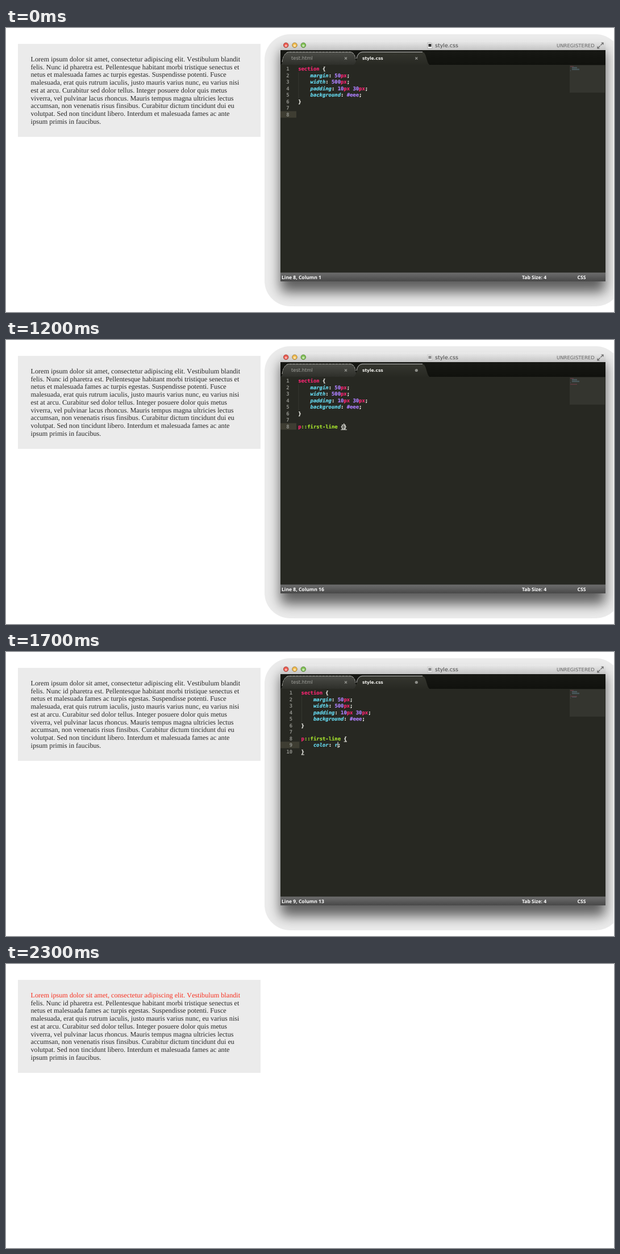
An HTML page that plays this animation: 1070 by 501 pixels, repeating every 2400 ms.

```html
<!DOCTYPE html>
<html lang="en">
<head>
<meta charset="utf-8">
<title>First line</title>
<style>
html, body { margin: 0; width: 100%; height: 100%; overflow: hidden; background: #fff; }
svg { display: block; width: 1070px; height: 501px; }
text { white-space: pre; text-rendering: geometricPrecision; }
.prose { font: 12.2px "Liberation Serif", "Times New Roman", serif; font-kerning: none; fill: #282828; }
.ui { font-family: "DejaVu Sans", sans-serif; }
.status { font: bold 8.55px "Open Sans", sans-serif; fill: #fff; }
.code { font: bold 8.9px "DejaVu Sans Mono", monospace; color: #f8f8f2; }
.code text, .code tspan { fill: currentColor; stroke: currentColor; stroke-width: .2; }
.code .num { color: #90918b; stroke: none; text-anchor: end; }
.menu { font: 8.9px "DejaVu Sans Mono", monospace; fill: #4c4c4c; }
.menu .hit { font-weight: bold; fill: #222; }
.tag { color: #f92672; }
.prop { color: #66d9ef; font-style: italic; }
.val { color: #66d9ef; }
.lit { color: #ae81ff; }
.pseudo { color: #a6e22e; }
</style>
</head>
<body>
<svg viewBox="0 0 1070 501">
  <defs>
    <linearGradient id="bar" x2="0" y2="1"><stop stop-color="#ebebeb"/><stop offset="1" stop-color="#c4c4c4"/></linearGradient>
    <linearGradient id="strip" x2="0" y2="1"><stop stop-color="#171814"/><stop offset="1" stop-color="#10110d"/></linearGradient>
    <linearGradient id="idle" x2="0" y2="1"><stop stop-color="#4b4c47"/><stop offset="1" stop-color="#2e2f2a"/></linearGradient>
    <linearGradient id="live" x2="0" y2="1"><stop stop-color="#35362f"/><stop offset="1" stop-color="#272822"/></linearGradient>
    <linearGradient id="foot" x2="0" y2="1"><stop stop-color="#6d6d6d"/><stop offset="1" stop-color="#484848"/></linearGradient>
    <linearGradient id="pick" x2="0" y2="1"><stop stop-color="#98bbe6"/><stop offset="1" stop-color="#6394d0"/></linearGradient>
    <filter id="blur" x="-10%" y="-15%" width="120%" height="130%"><feGaussianBlur stdDeviation="11"/></filter>
    <clipPath id="halo"><rect x="455" y="11" width="628" height="480" rx="45"/></clipPath>
    <clipPath id="edge"><rect width="1069" height="501"/></clipPath>
  </defs>

  <rect x="21" y="28" width="427" height="164" fill="#ebebeb"/>
  <g id="prose" class="prose"></g>

  <g id="win" clip-path="url(#edge)">
    <g clip-path="url(#halo)">
      <rect x="455" y="11" width="628" height="480" fill="#ebebeb"/>
      <rect x="483" y="40" width="572" height="426" rx="6" fill="#000" opacity=".6" filter="url(#blur)"/>
    </g>
    <path d="M483 39V26q0-4 4-4H1051q4 0 4 4V39z" fill="url(#bar)"/>
    <g stroke-width=".8">
      <circle cx="492.7" cy="30.3" r="4.3" fill="#ee5b50" stroke="#8f3a35"/>
      <circle cx="508" cy="30.3" r="4.3" fill="#f3bd4e" stroke="#8f6f33"/>
      <circle cx="523.3" cy="30.3" r="4.3" fill="#83c356" stroke="#4c7535"/>
    </g>
    <g fill="#fff" opacity=".55">
      <circle cx="492.7" cy="31.3" r="2"/><circle cx="508" cy="31.3" r="2"/><circle cx="523.3" cy="31.3" r="2"/>
    </g>
    <g id="icon"><path d="M742 26h6l2 2v8h-8z" fill="#f5f5f5" stroke="#888" stroke-width=".6"/><rect x="743.5" y="28" width="5" height="5" fill="#333"/></g>
    <text class="ui" x="755" y="34.2" font-size="9.5" fill="#444">style.css</text>
    <text class="ui" x="969" y="33.6" font-size="8.5" fill="#666">UNREGISTERED</text>
    <path d="M1046.5 30.5 1051 26M1047.5 26H1051V29.5M1045.5 31.5 1041 36M1041 32.5V36H1044.5" fill="none" stroke="#666" stroke-width="1.2"/>

    <rect x="483" y="39" width="572" height="27" fill="url(#strip)"/>
    <path d="M483 65C489 63 488 42 498 42H606C615 42 614 62 621 65z" fill="url(#idle)"/>
    <path d="M486 60Q489 43 498 42.3H606Q613 43 615 54" fill="none" stroke="#d8d8d4" stroke-width=".8" stroke-dasharray="5 .8"/>
    <path d="M610 66C619 63 617 42 627 42H732C741 42 739 63 747 66z" fill="url(#live)"/>
    <path d="M617 54Q619 43 627 42.3H733" fill="none" stroke="#eee" stroke-width=".8"/>
    <rect x="483" y="65" width="572" height="367" fill="#272822"/>
    <g class="ui" font-size="8.4">
      <text x="502" y="56.3" fill="#a2a39e">test.html</text>
      <text x="627" y="56.3" fill="#f4f4f0" font-weight="bold" font-size="7.5">style.css</text>
    </g>
    <path d="M596 51.5l4 4m0-4l-4 4" stroke="#92938e" stroke-width="1.2"/>
    <path id="close" d="M720.3 51.5l4 4m0-4l-4 4" stroke="#92938e" stroke-width="1.2"/>
    <circle id="dirty" cx="722.3" cy="53.5" r="2.6" fill="#8c8d88"/>

    <rect x="992" y="66" width="62" height="48" fill="#34352f"/>
    <g id="mini" opacity=".5"></g>
    <g id="code" class="code"></g>
    <rect id="caret" width="1" height="10.5" fill="#f8f8f0"/>
    <g id="menu" class="menu"></g>

    <rect x="483" y="431.5" width="572" height="15.5" fill="url(#foot)"/>
    <g class="status">
      <text id="status" x="485" y="442.5"></text>
      <text x="908" y="442.5">Tab Size: 4</text>
      <text x="1005.5" y="442.5">CSS</text>
    </g>
  </g>
  <path id="mouse" d="M340.5 205V214.5L342.7 212.6 344 215.6 345.4 215 344.1 212.1H347z" fill="#fff" stroke="#222" stroke-width=".8"/>
</svg>
<script>
const $ = id => document.getElementById(id);
const CHAR = 5.358, ROW = 11.5, LOOP = 2400, STEP = 100;

const prose = `Lorem ipsum dolor sit amet, consectetur adipiscing elit. Vestibulum blandit
felis. Nunc id pharetra est. Pellentesque habitant morbi tristique senectus et
netus et malesuada fames ac turpis egestas. Suspendisse potenti. Fusce
malesuada, erat quis rutrum iaculis, justo mauris varius nunc, eu varius nisi
est at arcu. Curabitur sed dolor tellus. Integer posuere dolor quis metus
viverra, vel pulvinar lacus rhoncus. Mauris tempus magna ultricies lectus
accumsan, non venenatis risus finsibus. Curabitur dictum tincidunt dui eu
volutpat. Sed non tincidunt libero. Interdum et malesuada fames ac ante
ipsum primis in faucibus.`.split("\n");
$("prose").innerHTML = prose.map((s, i) =>
  `<text x="43.5" y="${58.9 + i * 13.75}">${s}</text>`).join("");

const span = (cls, s) => `<tspan class="${cls}">${s}</tspan>`;
const px = n => span("lit", n) + span("tag", "px");
const rule = (name, value) => `    ${span("prop", name)}: ${value};`;
const base = [
  span("tag", "section") + " {",
  rule("margin", px(50)),
  rule("width", px(500)),
  rule("padding", px(10) + " " + px(30)),
  rule("background", span("lit", "#eee")),
  "}", ""
];

const items = ["content", "color", "counter-reset", "counter-increment",
  "background-color", "outline-color", "border-collapse", "border-color"];
function drawMenu(sel) {
  $("menu").innerHTML = sel < 0 ? "" :
    `<rect x="549.5" y="171" width="230" height="111" fill="#fff" stroke="#999" stroke-width=".8"/>
     <rect x="550" y="${171.3 + sel * 13.75}" width="229" height="13.6" fill="url(#pick)"/>` +
    items.map((s, i) => `<text x="553.5" y="${181 + i * 13.75}">${
      s.replace(/co(?=nt|l|u)/, span("hit", "co"))}</text>`).join("") +
    `<rect x="772.5" y="173" width="5" height="60" rx="2.5" fill="#777"/>`;
}

const selector = "p::first-line {";
const typed = [0, 0, 0, 0, 0, 0, 1, 2, 3, 5, 8, 13, 15];
const body = ["", "co", "co", "color: ", "color: r", "color: re", "color: red"];

// Everything shown in the editor during one step of the typing
function state(k) {
  if (k < 13) {
    const s = selector.slice(0, typed[k]);
    const head = span("tag", s.slice(0, s.length < 3 ? 2 : 1)) +
      (s.length > 2 ? span("pseudo", s.slice(1, 13)) : "") + s.slice(13);
    return { lines: [...base, head + (s.length === 15 ? "}" : "")],
      row: 7, col: s.length, open: s.length === 15, menu: -1 };
  }
  const s = body[Math.min(k - 13, 6)], full = s.includes(":");
  const decl = full ? rule("color", span("val", s.slice(7))) : "    " + s;
  return { lines: [...base, span("tag", "p") + span("pseudo", "::first-line") + " {", decl, "}"],
    row: 8, col: 4 + s.length, open: true, menu: k === 14 ? 0 : k === 15 ? 1 : -1 };
}

const show = (id, on) => $(id).setAttribute("display", on ? "inline" : "none");
const bar = (x, y, w, h, fill) =>
  `<rect x="${x}" y="${y}" width="${w}" height="${h}" fill="${fill}"/>`;

function drawEditor(k) {
  const { lines, row, col, open, menu } = state(k);
  const wide = lines.length > 9 ? 5.4 : 0, left = 514.2 + wide;
  const top = i => 66.6 + i * ROW;
  let out = bar(483, top(row) - .4, 28 + wide, ROW, "#3e3d32") +
    bar(left + .4, top(1), .6, 4 * ROW, "#40413a");
  lines.forEach((s, i) => {
    out += `<text class="num" x="${498.7 + wide}" y="${75.3 + i * ROW}">${i + 1}</text>` +
      `<text x="${left}" y="${75.3 + i * ROW}">${s}</text>`;
  });
  if (open) {
    const under = (c, r) => bar(left + c * CHAR, top(r) + 10.6, CHAR, .9, "#f8f8f2");
    out += under(14, 7) + (row === 8 ? under(0, 9) : under(15, 7));
  }
  $("code").innerHTML = out;

  const widths = [6, 9, 9, 13, 13, 1, 0, Math.min(col, 12), 8, 1];
  $("mini").innerHTML = lines.map((s, i) =>
    bar(993 + (/^    /.test(s) ? 3 : 0), 67.5 + i * 1.45, widths[i], .9,
      i % 7 ? "#6c93a8" : "#c84a6c")).join("");

  $("caret").setAttribute("x", left + col * CHAR - .3);
  $("caret").setAttribute("y", top(row) - .1);
  show("caret", k > 2);
  drawMenu(menu);

  const dirty = k > 5 && k < 20;
  show("dirty", dirty);
  show("close", !dirty);
  $("icon").setAttribute("opacity", dirty ? .45 : 1);
  $("status").textContent = `Line ${row + 1}, Column ${col + 1}` +
    (k === 20 ? "; Saved /Applications/MAMP/htdocs/test/style.css (UTF-8)" : "");
}

let last = -1;
function draw(t) {
  const k = Math.floor(t % LOOP / STEP);
  if (k === last) return;
  last = k;
  const done = k > 20;
  show("win", !done);
  show("mouse", k > 19 && k < 23);
  $("prose").firstChild.style.fill = done ? "#f8301f" : "";
  if (!done) drawEditor(k);
}

const start = performance.now();
function tick() {
  draw(performance.now() - start);
  requestAnimationFrame(tick);
}
tick();
</script>
</body>
</html>
```
